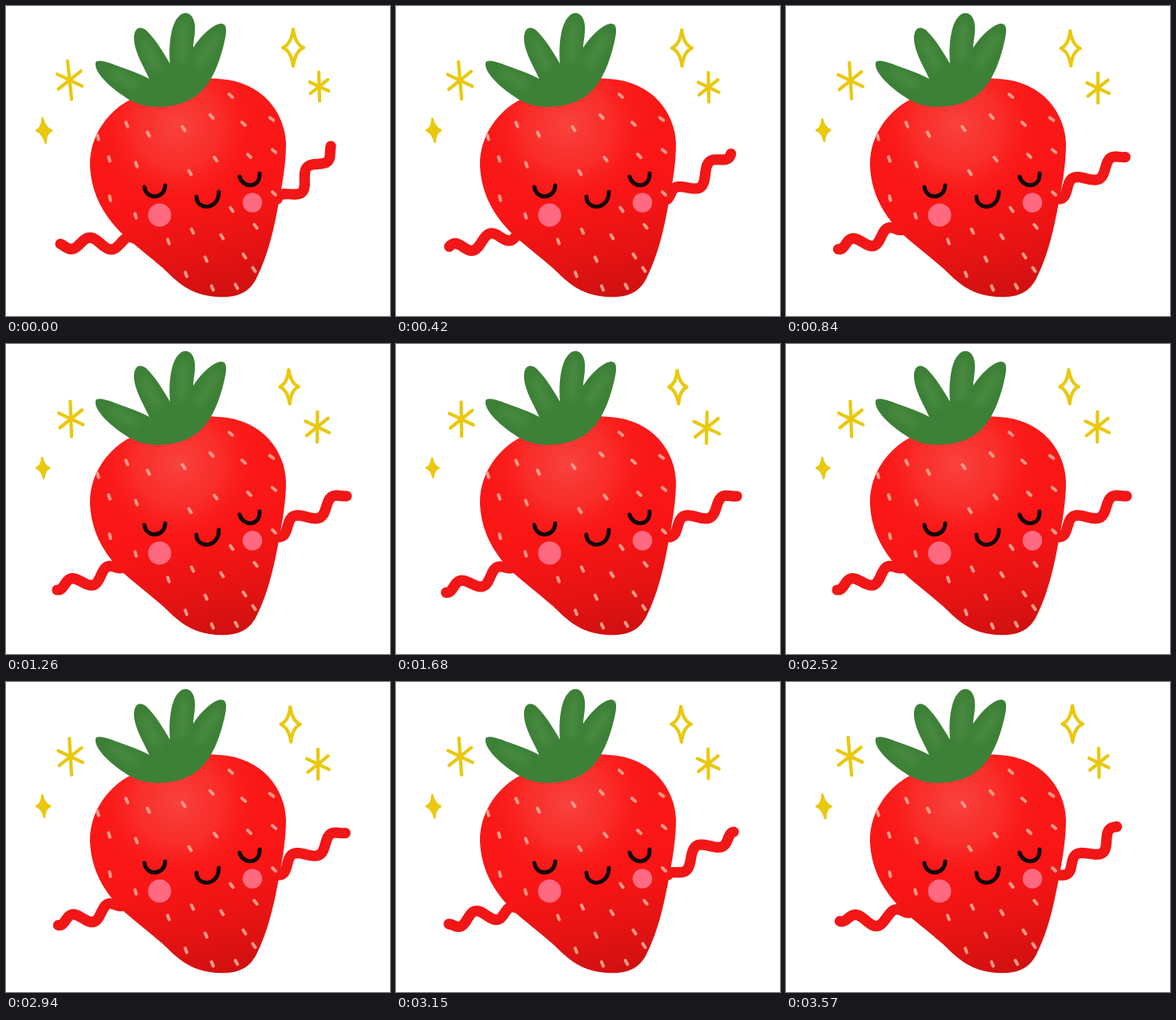
An HTML page that plays this animation: 480 by 387 pixels, repeating every 3.78 s.

```html
<!DOCTYPE html>
<html lang="en">
<head>
<meta charset="utf-8">
<title>Dancing strawberry</title>
<style>
  html, body { margin: 0; width: 100%; height: 100%; overflow: hidden; background: #fff; }
  svg { display: block; width: 100vw; height: 100vh; }
  .line { fill: none; stroke-linecap: round; stroke-linejoin: round; }
  .arm { stroke: #f21616; stroke-width: 13.2; }
  .face { stroke: #120808; stroke-width: 5; }
  .gold { stroke: #eac80e; stroke-width: 4.2; }
  .seed { stroke: #f59a88; stroke-width: 4; }
</style>
</head>
<body>
<svg viewBox="0 0 480 387" preserveAspectRatio="none">
  <defs>
    <linearGradient id="skin" gradientUnits="userSpaceOnUse" x1="205" y1="95" x2="262" y2="365">
      <stop offset="0" stop-color="#fa1a18"/>
      <stop offset=".55" stop-color="#f91515"/>
      <stop offset=".8" stop-color="#e61313"/>
      <stop offset="1" stop-color="#d01010"/>
    </linearGradient>
    <radialGradient id="shine" gradientUnits="userSpaceOnUse" cx="215" cy="150" r="105">
      <stop offset="0" stop-color="#f84a44" stop-opacity=".85"/>
      <stop offset=".5" stop-color="#f93c37" stop-opacity=".6"/>
      <stop offset="1" stop-color="#fa1a18" stop-opacity="0"/>
    </radialGradient>
    <filter id="soft" x="-50%" y="-50%" width="200%" height="200%"><feGaussianBlur stdDeviation="5"/></filter>
    <path id="crown" d="M112 71C113 66 125 69 140 75C155 80 170 86 179 91C175 80 160 58 160 40C160 27 168 24 176 31C188 43 198 60 205 72C203 50 206 22 216 13C224 4 235 10 236 24C237 34 234 45 234 52C243 38 257 24 268 22C276 21 276 30 274 40C270 60 262 85 250 100C236 118 215 126 188 126C175 126 160 122 148 113C128 100 110 82 112 71Z"/>
    <clipPath id="crownClip"><use href="#crown"/></clipPath>
    <path id="berry" d="M155 117C130 130 104 160 105 200C107 238 125 265 148 287C165 302 180 313 196 327C214 344 228 360 262 363C288 365 304 358 313 340C328 310 335 278 341 245C346 220 350 195 350 172C349 135 322 94 266 91L250 90Z"/>
  </defs>
  <path id="armR" class="line arm"/>
  <path id="armL" class="line arm"/>
  <use href="#berry" fill="url(#skin)"/>
  <use href="#berry" fill="url(#shine)"/>
  <path id="seeds" class="line seed"/>
  <use href="#crown" fill="#3d8037"/>
  <g clip-path="url(#crownClip)">
    <path class="line" filter="url(#soft)" stroke="#57954c" stroke-width="11" opacity=".55"
      d="M135 84L160 98M174 46L188 76M222 26L219 66M262 40L242 72"/>
  </g>
  <circle cx="192" cy="261" r="14.5" fill="#ff6a80"/>
  <circle cx="308" cy="245.500" r="12.2" fill="#ff6a80"/>
  <path class="line face" d="M173 226C175 242 198 242 199 224M292 213C296 228 318 228 317 209M238 238C238 255 266 256 266 232"/>
  <path id="sparkle" class="line gold"/>
  <path id="starR" class="line gold"/>
  <path id="starL" class="line gold"/>
  <path id="glint" class="line gold" style="fill: #eac80e; stroke-width: 2.6"/>
</svg>
<script>
const STEP = 210, STEPS = 18, SETTLE = 4;
const $ = id => document.getElementById(id);
const mix = (a, b, t) => a + (b - a) * t;
const mixAll = (a, b, t) => a.map((v, i) => mix(v, b[i], t));

// Seed centres; the tilt follows from the place on the fruit
const seeds = [
  [151,148], [178,160], [222,153], [257,138], [281,112], [297,147], [332,141],
  [115,164], [129,191], [163,198], [230,208], [262,191], [304,187], [335,181],
  [130,240], [162,262], [282,254], [312,275], [335,234], [203,294], [233,281],
  [270,288], [298,312], [250,316], [225,335], [258,352], [288,350], [310,329]
];
$('seeds').setAttribute('d', seeds.map(([x, y]) => {
  const a = (62 + .08 * (y - 230) - .16 * (x - 220)) * Math.PI / 180;
  const dx = 2.8 * Math.cos(a), dy = 2.8 * Math.sin(a);
  return `M${x - dx} ${y - dy}L${x + dx} ${y + dy}`;
}).join(''));

// Each arm is a wave that runs along the line from shoulder to hand, then settles
const arms = {
  armR: { shoulder: [[339,241], [340,241]], hand: [[406,175], [426,190]], snap: 4,
          bend: [8, -4], crest: [.28, -.62], amp: 10 },
  armL: { shoulder: [[160,290], [146,279]], hand: [[68,297], [62,312]], snap: 1,
          bend: [4, 0], crest: [.3, 1.08], amp: 9 }
};
const WAVE = .6;

function drawArm({ shoulder, hand, snap, bend, crest, amp }, pos) {
  const settle = Math.min(1, pos / SETTLE);
  const [x0, y0] = mixAll(...shoulder, settle);
  const [x1, y1] = mixAll(...hand, 1 - (1 - pos / 9) ** snap);
  const dx = x1 - x0, dy = y1 - y0, len = Math.hypot(dx, dy) * Math.sign(dx);
  const bow = mix(...bend, settle), peak = mix(...crest, settle);
  const points = [];
  for (let i = 0; i <= 40; i++) {
    const u = i / 40;
    const fade = (1 - u ** 8) * (1 - (1 - u) ** 8);
    const off = bow * Math.sin(Math.PI * u)
      + amp * fade * Math.cos(2 * Math.PI * (u - peak) / WAVE);
    points.push([x0 + dx * u - dy / len * off, y0 + dy * u + dx / len * off]);
  }
  return 'M' + points.join('L');
}

// Twinkles at both ends of the swing: x, y, half width, half height, lean
const twinkles = {
  sparkle: { from: [359,52,13,23,0], to: [351.5,54,11,20.5,-1], draw: diamond },
  glint: { from: [47.5,155.5,9.5,15.5,-2], to: [45.5,154.5,7.5,11.5,-.5], draw: diamond },
  starR: { from: [391.5,100.5,13.5,18,-.5], to: [388,105,18.5,19.5,.5], draw: star },
  starL: { from: [79.5,92.5,17.5,24,-2.5], to: [82,94,17,21,0], draw: star }
};

function diamond([x, y, w, h, lean]) {
  const tips = [[x + lean, y - h], [x + w, y], [x - lean, y + h], [x - w, y]];
  return tips.reduce((d, [ax, ay], i) => {
    const [bx, by] = tips[(i + 1) % 4];
    return d + `Q${mix(x, (ax + bx) / 2, .38)} ${mix(y, (ay + by) / 2, .38)} ${bx} ${by}`;
  }, `M${tips[0]}`) + 'Z';
}

function star([x, y, w, h, lean]) {
  const spoke = (dx, dy) => `M${x - dx} ${y - dy}L${x + dx} ${y + dy}`;
  return spoke(lean, -h) + spoke(w * .8, -w * .64) + spoke(w * .88, w * .42);
}

let shown = -1;
function render(now) {
  const step = Math.floor(now / STEP) % STEPS;
  const pos = Math.min(step, STEPS - step);
  if (pos === shown) return;
  shown = pos;
  for (const id in arms) $(id).setAttribute('d', drawArm(arms[id], pos));
  for (const id in twinkles) {
    const { from, to, draw } = twinkles[id];
    $(id).setAttribute('d', draw(mixAll(from, to, pos / 9)));
  }
}

const start = performance.now();
function tick() {
  render(performance.now() - start);
  requestAnimationFrame(tick);
}
tick();
</script>
</body>
</html>
```
